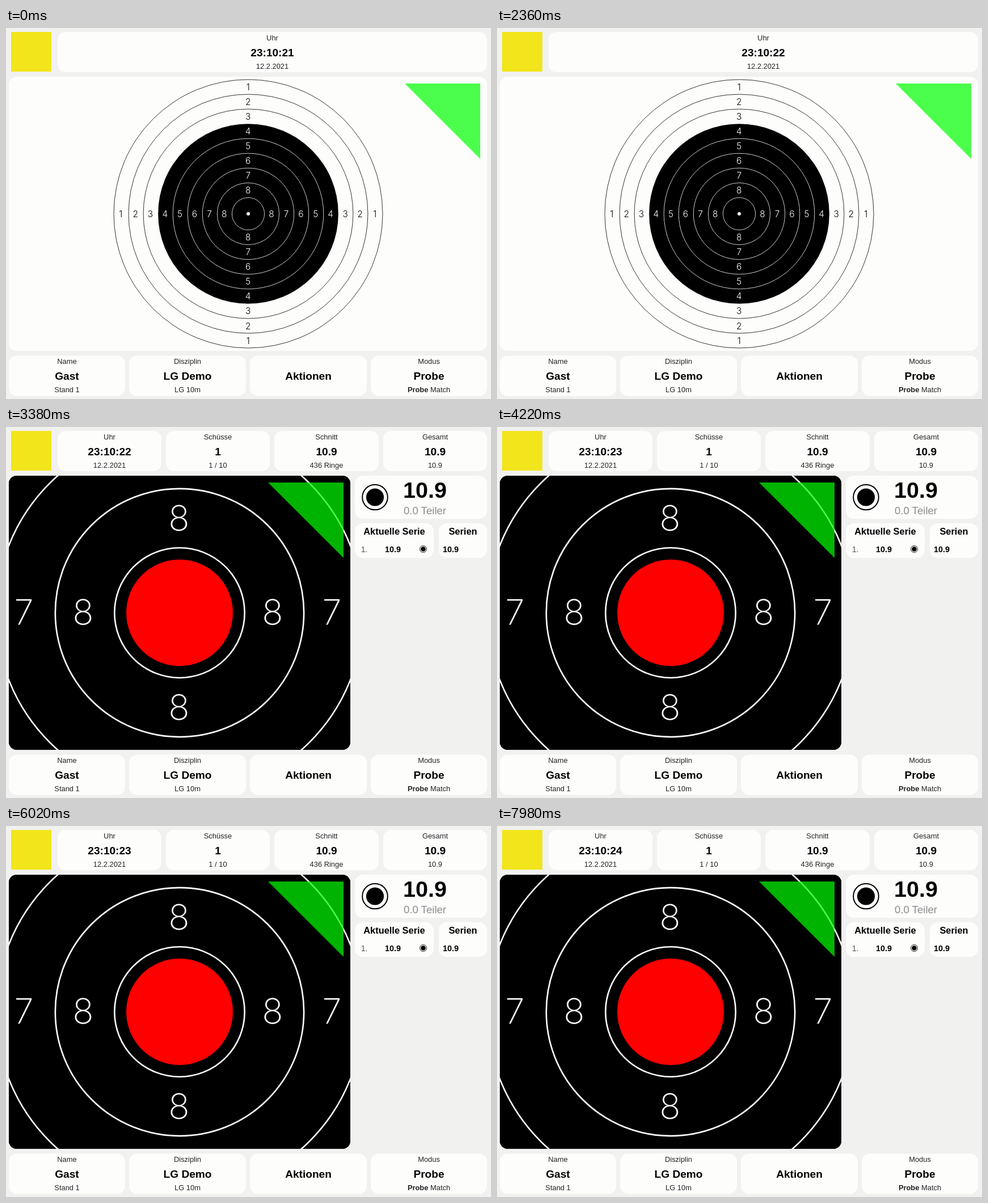
An HTML page for the animation above (8000 ms loop, 855 by 655 pixels).

```html
<!DOCTYPE html>
<html lang="de">
<head>
<meta charset="utf-8">
<title>Schießstand</title>
<style>
  html, body { margin: 0; width: 100%; height: 100%; overflow: hidden; background: #f1f1ef; }
  svg { display: block; }
  text { font-family: "Liberation Sans", Arial, sans-serif; text-anchor: middle; fill: #000; }
  .small { font-size: 12.9px; fill: #222; }
  .big { font-size: 19.1px; font-weight: 700; }
  .bold { font-weight: 700; }
  .ring { font-family: Inter, "Liberation Sans", sans-serif; }
</style>
</head>
<body>
<svg id="stage" width="855" height="655" viewBox="0 0 855 655"></svg>
<script>
const LOOP = 8000;
const SHOT_AT = 3380;
const FIRST_TICK = 1140;
const SECOND_LENGTH = 2800; // the clock runs in slow motion

const box = (x, y, right, bottom, fill = '#fdfdfc') =>
  `<rect x="${x}" y="${y}" width="${right - x}" height="${bottom - y}" rx="14" fill="${fill}"/>`;

const text = (x, y, content, attrs) => `<text x="${x}" y="${y}" ${attrs}>${content}</text>`;

const circle = (x, y, r, fill, stroke = 'none', width = 0) =>
  `<circle cx="${x}" cy="${y}" r="${r}" fill="${fill}" stroke="${stroke}" stroke-width="${width}"/>`;

// A card with a label, a bold value and a footnote
function card(x, right, y, label, value, note, valueClass = '') {
  const mid = (x + right) / 2;
  return box(x, y, right, y + 71) +
    text(mid, y + 14.6, label, 'class="small"') +
    text(mid, y + 42.7, value, `class="big ${valueClass}"`) +
    text(mid, y + 64.8, note, 'class="small"');
}

function target(cx, cy, scale, weight) {
  const radius = ring => (28.6 + (9 - ring) * 26.05) * scale;
  const size = 15.4 * scale;
  const line = 0.2 + 0.6 * scale;
  let out = '';
  for (let ring = 1; ring <= 9; ring++) {
    const dark = ring >= 4;
    out += circle(cx, cy, radius(ring), ring === 4 ? '#000' : 'none', dark ? '#fff' : '#000', ring === 4 ? 0 : line);
    if (ring === 9) continue;
    const gap = radius(ring) - 13 * scale;
    const attrs = `class="ring" font-size="${size}" font-weight="${weight}" style="fill:${dark ? '#fff' : '#000'}"`;
    const base = cy + size * 0.363;
    const midX = cx - 0.75 * scale;
    out += text(cx - 0.3 * scale, base - gap, ring, attrs) +
      text(cx - 0.3 * scale, base + gap, ring, attrs) +
      text(midX - gap, base - 0.6 * (scale - 1), ring, attrs) +
      text(midX + gap, base - 0.6 * (scale - 1), ring, attrs);
  }
  return out + circle(cx, cy, 3 * scale, '#fff');
}

const flag = right =>
  `<path d="M${right - 133} 98H${right}V231Z" fill="#0f0" opacity=".7"/>`;

const shotIcon = (x, y, outer, inner, width) =>
  circle(x, y, outer, '#fff', '#000', width) + circle(x, y, inner, '#000');

const date = '12.2.2021';

const waiting = card(91, 848, 7, 'Uhr', '', date, 'clock') +
  box(5, 86, 848, 570) + target(427, 328, 1, 300) + flag(836);

const scored = card(91, 274, 7, 'Uhr', '', date, 'clock') +
  card(282, 465, 7, 'Schüsse', '1', '1 / 10') +
  card(473, 657, 7, 'Schnitt', '10.9', '436 Ringe') +
  card(665, 848, 7, 'Gesamt', '10.9', '10.9') +
  box(5, 86, 607, 570, '#000') +
  `<g clip-path="url(#panel)">${target(306, 328, 4.01, 200)}</g>` +
  circle(306, 328, 94, '#f00') + flag(595) +
  box(615, 86, 848, 162) + shotIcon(650.5, 124, 22.3, 15.6, 2) +
  text(738.5, 125, '10.9', 'class="bold" font-size="39.5"') +
  text(738.5, 154, '0.0 Teiler', 'font-size="18.6" style="fill:#8c8c8c"') +
  box(615, 170, 754, 231) + box(763, 170, 848, 231) +
  text(684.5, 189.5, 'Aktuelle Serie', 'class="bold" font-size="16.4"') +
  text(805.5, 189.5, 'Serien', 'class="bold" font-size="16.4"') +
  text(631.5, 221, '1.', 'font-size="14" style="fill:#555"') +
  text(682, 221, '10.9', 'class="bold" font-size="14.4"') +
  text(784, 221, '10.9', 'class="bold" font-size="14.4"') +
  shotIcon(735.5, 215.5, 6, 4.3, 0.9);

const footer = card(5, 210, 578.5, 'Name', 'Gast', 'Stand 1') +
  card(217, 423, 578.5, 'Disziplin', 'LG Demo', 'LG 10m') +
  card(430, 636, 578.5, '', 'Aktionen', '') +
  card(643, 848, 578.5, 'Modus', 'Probe', '<tspan class="bold">Probe</tspan> Match');

const stage = document.getElementById('stage');
stage.innerHTML =
  `<clipPath id="panel">${box(5, 86, 607, 570)}</clipPath>
   <rect width="855" height="655" fill="#f1f1ef"/>
   <rect x="9" y="7" width="71" height="70" fill="#f2e51b"/>
   <g id="waiting">${waiting}</g><g id="scored">${scored}</g>${footer}`;

const scenes = ['waiting', 'scored'].map(id => document.getElementById(id));
const clocks = stage.querySelectorAll('.clock');
const start = performance.now();

function draw() {
  const time = (performance.now() - start) % LOOP;
  const shot = time >= SHOT_AT;
  scenes[0].style.display = shot ? 'none' : '';
  scenes[1].style.display = shot ? '' : 'none';
  const seconds = 22 + Math.floor((time - FIRST_TICK) / SECOND_LENGTH);
  clocks.forEach(clock => { clock.textContent = `23:10:${seconds}`; });
  requestAnimationFrame(draw);
}
draw();
</script>
</body>
</html>
```
